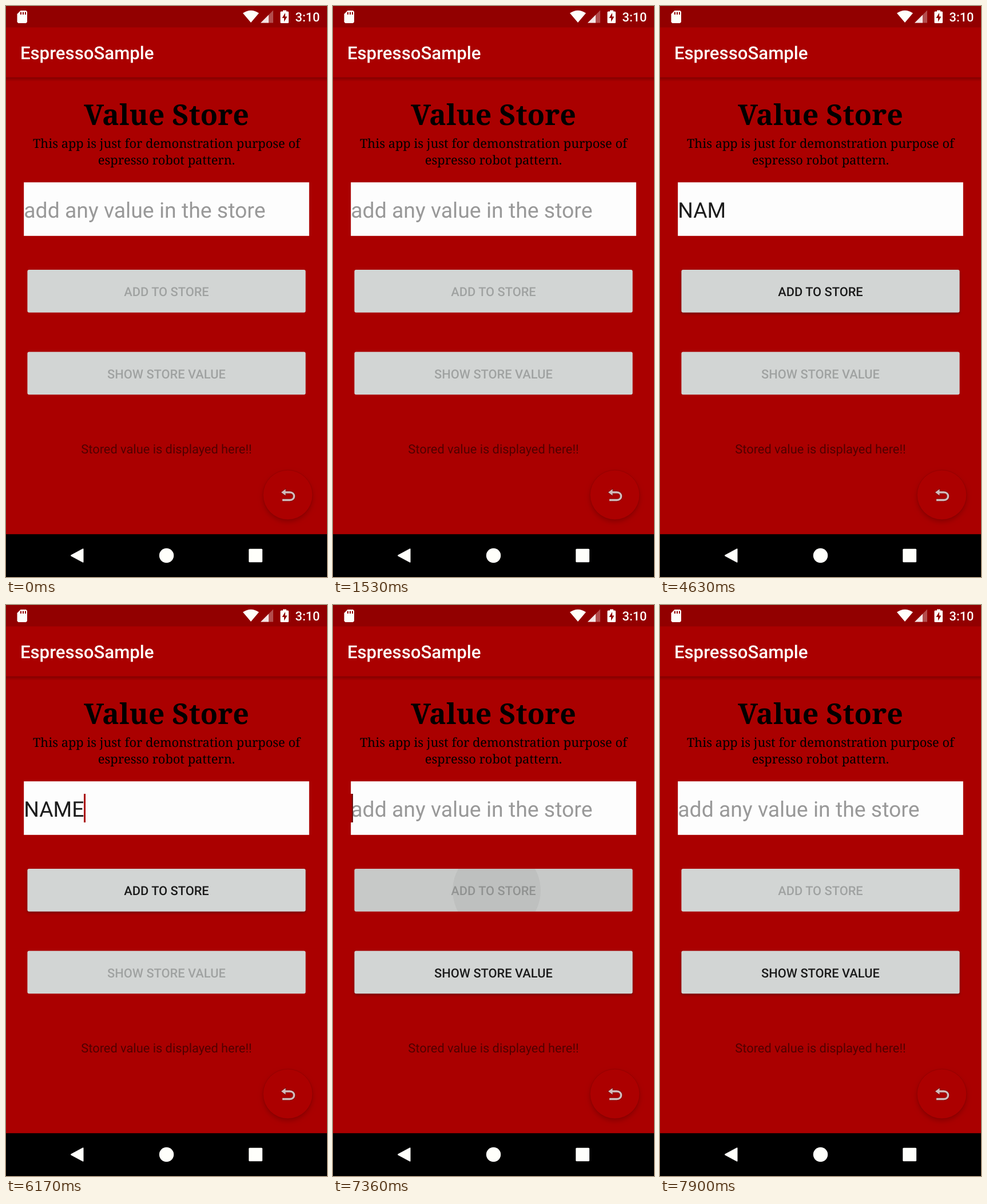
These frames come from a looping animation (561 px wide and 998 px high, 8000 ms). An HTML page with a canvas:

```html
<!DOCTYPE html>
<html lang="en">
<head>
<meta charset="utf-8">
<title>Value Store</title>
<style>
  html, body { margin: 0; width: 100%; height: 100%; overflow: hidden; background: #a00; }
  canvas { display: block; width: 561px; height: 998px; }
</style>
</head>
<body>
<canvas id="stage" width="561" height="998"></canvas>
<script>
const ctx = document.getElementById('stage').getContext('2d');
ctx.textRendering = 'geometricPrecision';

const LOOP = 8000, CLICK = 7180;
const RED = '#aa0000', WHITE = '#fffffb';
const INK = 'rgba(0,0,0,.88)', FAINT = 'rgba(0,0,0,.24)';
const SANS = 'Roboto, sans-serif', SERIF = '"Noto Serif", serif';

// [start time, typed text, cursor shown]
const STATES = [
  [0, '', false], [1700, '', true], [2240, '', false], [2730, '', true],
  [3260, '', false], [3570, '', true], [3750, 'N', true], [3930, 'NA', true],
  [4460, 'NAM', true], [4630, 'NAM', false], [5160, 'NAME', true],
  [5640, 'NAME', false], [6170, 'NAME', true], [6650, 'NAME', false],
  [CLICK, '', true], [7690, '', false]
];

const clamp = v => Math.max(0, Math.min(1, v));
const ramp = (t, a, b) => clamp((t - a) / (b - a));

function rect(x, y, w, h, color) {
  ctx.fillStyle = color;
  ctx.fillRect(x, y, w, h);
}

function disc(x, y, r, color) {
  ctx.fillStyle = color;
  ctx.beginPath();
  ctx.arc(x, y, r, 0, 7);
  ctx.fill();
}

function poly(points, color) {
  ctx.fillStyle = color;
  ctx.beginPath();
  points.forEach(([x, y]) => ctx.lineTo(x, y));
  ctx.closePath();
  ctx.fill();
}

function label(str, x, y, font, color, align = 'center') {
  ctx.font = font;
  ctx.fillStyle = color;
  ctx.textAlign = align;
  ctx.fillText(str, x, y);
}

function shadow(alpha, blur, dy) {
  ctx.shadowColor = `rgba(0,0,0,${alpha})`;
  ctx.shadowBlur = blur;
  ctx.shadowOffsetY = dy;
}

function statusBar() {
  rect(0, 0, 561, 37.4, '#920000');
  // memory card
  poly([[25.5, 8], [35, 8], [37, 10], [37, 28], [35, 30], [21.5, 30], [19.5, 28], [19.5, 14]], WHITE);
  for (const x of [25, 29, 33]) rect(x, 10.5, 2, 4.5, '#920000');
  // wifi
  ctx.fillStyle = WHITE;
  ctx.beginPath();
  ctx.moveTo(428, 29);
  ctx.lineTo(414, 12.5);
  ctx.quadraticCurveTo(428, 3, 442, 12.5);
  ctx.fill();
  // mobile signal
  poly([[445, 29.5], [467, 7.5], [467, 29.5]], 'rgba(255,255,255,.3)');
  poly([[445, 29.5], [459, 15.5], [459, 29.5]], 'rgba(255,255,255,.85)');
  // battery
  rect(484, 7.5, 6, 4, WHITE);
  ctx.fillStyle = WHITE;
  ctx.beginPath();
  ctx.roundRect(479.5, 9.5, 14.5, 20.5, 1.5);
  ctx.fill();
  poly([[488, 12], [482.5, 21], [486, 21], [486, 27.5], [491.5, 18.5], [488, 18.5]], '#920000');
  label('3:10', 505.5, 27, `500 21.8px ${SANS}`, WHITE, 'left');
}

function appBar() {
  const g = ctx.createLinearGradient(0, 124.7, 0, 132);
  g.addColorStop(0, 'rgba(0,0,0,.24)');
  g.addColorStop(1, 'rgba(0,0,0,0)');
  rect(0, 124.7, 561, 8, g);
  label('EspressoSample', 24.9, 93, `500 31.17px ${SANS}`, WHITE, 'left');
}

function field(text, cursor) {
  rect(31.2, 308.2, 498.6, 93.6, '#fdfdfd');
  const font = `37.4px ${SANS}`;
  label(text || 'add any value in the store', 31.2, 370, font, text ? '#1c1c1c' : '#999', 'left');
  if (!cursor) return;
  if (text) {
    const end = Math.round(31.2 + ctx.measureText(text).width);
    rect(end, 330, 3, 50, RED);
  } else {
    rect(31, 330, 2, 50, RED);
    rect(33, 330, 2, 50, '#6a1010');
  }
}

function button(str, y, enabled, overlay) {
  ctx.save();
  ctx.beginPath();
  ctx.roundRect(37.4, y, 486.2, 74.8, 3);
  ctx.fillStyle = '#d2d5d4';
  if (enabled) shadow(.35, 4, 2);
  ctx.fill();
  shadow(0, 0, 0);
  ctx.clip();
  if (overlay) overlay();
  ctx.restore();
  label(str, 280.5, y + 46, `500 21.8px ${SANS}`, enabled ? INK : FAINT);
}

function ripple(t) {
  const press = ramp(t, CLICK - 20, 7300) * (1 - ramp(t, 7400, 7880));
  const ring = 1 - ramp(t, 7330, 7600);
  rect(37, 460, 488, 77, `rgba(0,0,0,${.055 * press})`);
  disc(286, 499, (t - 7148) * .361, `rgba(0,0,0,${.055 * ring})`);
}

function fab() {
  ctx.save();
  shadow(.2, 9, 4);
  disc(492.5, 854.5, 43.3, '#ac0000');
  ctx.restore();
  ctx.strokeStyle = 'rgba(80,0,0,.2)';
  ctx.lineWidth = 1;
  ctx.stroke();
  const hook = (width, color) => {
    ctx.strokeStyle = color;
    ctx.lineWidth = width;
    ctx.beginPath();
    ctx.moveTo(487, 850);
    ctx.lineTo(496, 850);
    ctx.bezierCurveTo(506, 850, 506, 863.5, 496, 863.5);
    ctx.lineTo(483, 863.5);
    ctx.stroke();
  };
  hook(5.5, '#850808');
  poly([[479.5, 850], [489.5, 842.5], [489.5, 857.5]], '#850808');
  hook(3.5, '#d2bcbc');
  poly([[481, 850], [488.5, 844.5], [488.5, 855.5]], '#d2bcbc');
}

function navBar() {
  rect(0, 923.2, 561, 75, '#000');
  poly([[114, 960.5], [134.5, 949.3], [134.5, 971.7]], WHITE);
  ctx.strokeStyle = WHITE;
  ctx.lineWidth = 2;
  ctx.lineJoin = 'round';
  ctx.stroke();
  disc(280.5, 960.5, 12.7, WHITE);
  ctx.beginPath();
  ctx.roundRect(424.3, 948.7, 23.8, 23.6, 1.5);
  ctx.fill();
}

function draw(t) {
  const [, text, cursor] = STATES.findLast(s => s[0] <= t);
  const stored = t >= CLICK;
  rect(0, 0, 561, 998, RED);
  statusBar();
  appBar();
  label('Value Store', 280.5, 208.3, `bold 49.87px ${SERIF}`, '#000');
  label('This app is just for demonstration purpose of', 280.5, 247.5, `21.8px ${SERIF}`, '#000');
  label('espresso robot pattern.', 280.5, 277.2, `21.8px ${SERIF}`, '#000');
  field(text, cursor);
  button('ADD TO STORE', 461, text !== '', stored && (() => ripple(t)));
  button('SHOW STORE VALUE', 604.5, stored);
  label('Stored value is displayed here!!', 280.5, 781.5, `21.8px ${SANS}`, '#500000');
  fab();
  navBar();
}

const start = performance.now();
function frame() {
  draw((performance.now() - start) % LOOP);
  requestAnimationFrame(frame);
}
frame();
</script>
</body>
</html>
```
